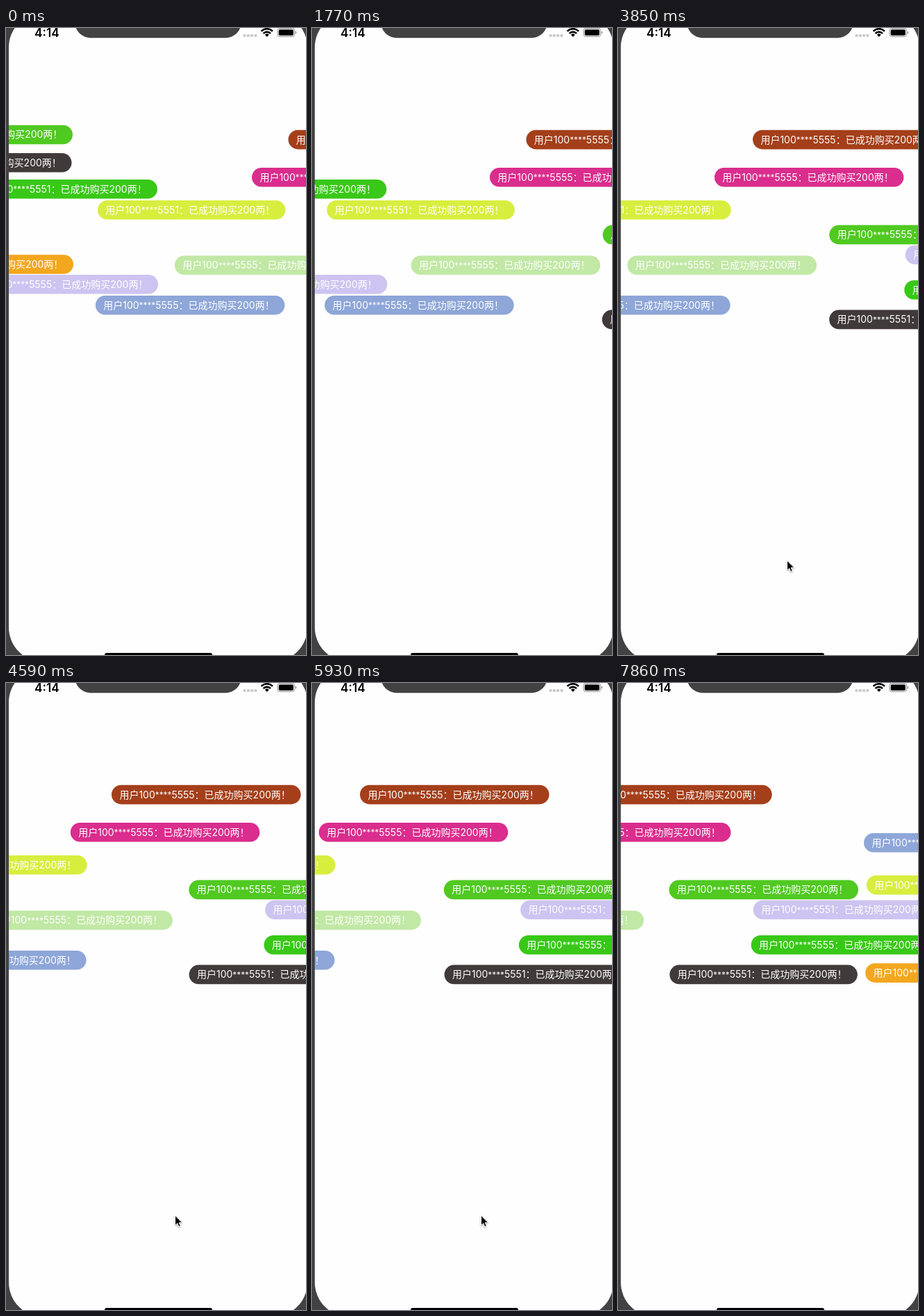
Animation of 432 by 902 pixels, one loop 8000 ms. Source, as an HTML page:

```html
<!DOCTYPE html>
<html lang="zh-CN">
<head>
<meta charset="utf-8">
<title>弹幕</title>
<style>
  html, body { margin: 0; width: 100%; height: 100%; overflow: hidden; background: #424242; }
  svg { display: block; }
  text { font-family: Inter, "Noto Sans CJK SC", "Noto Sans CJK", sans-serif; }
  .pill text { font-size: 14px; fill: #fff; }
  .pill .mask { font-size: 11.8px; }
  .clock { font-size: 17.2px; font-weight: 600; }
</style>
</head>
<body>
<svg width="432" height="902" viewBox="0 0 432 902">
  <defs>
    <clipPath id="screen"><rect x="4" y="-22" width="430" height="934" rx="50"/></clipPath>
  </defs>
  <g clip-path="url(#screen)">
    <rect width="440" height="902" fill="#fefefe"/>
    <g id="pills"></g>
    <rect x="99" y="-40" width="240" height="54.2" rx="23" fill="#424242"/>
    <text class="clock" x="41" y="13">4:14</text>
    <g fill="#c9c9c9">
      <rect x="341.5" y="9" width="4" height="3.8" rx="1"/>
      <rect x="346.8" y="9" width="4" height="3.8" rx="1"/>
      <rect x="352.1" y="9" width="4" height="3.8" rx="1"/>
      <rect x="357.4" y="9" width="4" height="3.8" rx="1"/>
    </g>
    <g fill="none" stroke="#000" stroke-width="2.6">
      <path d="M367.6 4.6a11.6 11.6 0 0 1 16.4 0"/>
      <path d="M370.6 7.8a7.4 7.4 0 0 1 10.4 0"/>
      <path d="M372.9 9.7a4.2 4.2 0 0 1 5.8 0L375.8 12.8z" fill="#000" stroke="none"/>
    </g>
    <rect x="391" y=".6" width="24.6" height="11.8" rx="3.2" fill="none" stroke="#8c8c8c"/>
    <rect x="392.7" y="2.2" width="21.2" height="8.6" rx="1.8"/>
    <path d="M416.8 4.4q1.5.5 1.5 2.1t-1.5 2.1z" fill="#8c8c8c"/>
    <rect x="142" y="899" width="155" height="6" rx="3"/>
  </g>
  <path id="cursor" d="M0 0V14.2L3.2 11.2L5.3 16.2L7.8 15.2L5.7 10.3H10.2Z" stroke="#fff" stroke-width="1"
        style="filter:drop-shadow(0 1px 1px rgba(0,0,0,.35))"/>
</svg>
<script>
const LOOP = 8000, EDGE = 435, HEIGHT = 27.6;
const ENTER_STEPS = 33.35;   // steps to slide fully into view
const EXIT_SPEED = 9.22;     // px per step after that
const WIDE = { width: 272.5, ending: '5555' };
const SLIM = { width: 270.5, ending: '5551' };

// [colour, top, step at which the pill is fully in view, label]
const PILLS = [
  ['#50c921', 139.7, -36.77, WIDE],
  ['#403a3b', 180, -36.93, WIDE],
  ['#f3a71f', 326.2, -36.66, WIDE],
  ['#38c817', 218, -23.54, SLIM],
  ['#cdc4f1', 355, -23.42, WIDE],
  ['#8ea6d8', 385, -3.65, WIDE],
  ['#d8ee3f', 248, -3.53, SLIM],
  ['#c1e8a5', 327.5, 9.84, WIDE],
  ['#da2d8d', 201, 23.44, WIDE],
  ['#a43f1a', 146.8, 29.86, WIDE],
  ['#403a3b', 405.6, 43.22, SLIM],
  ['#50c921', 283.6, 43.35, WIDE],
  ['#38c817', 363, 56.57, WIDE],
  ['#cdc4f1', 312.5, 56.73, SLIM],
  ['#8ea6d8', 216, 76.44, WIDE],
  ['#f3a71f', 403.3, 76.7, WIDE],
  ['#d8ee3f', 276.8, 76.84, SLIM]
];

// [first step, x, y]; no position means hidden
const CURSOR = [[0], [18, 243.5, 766], [47, 263.5, 831], [49, 270, 884], [50]];

// Steps last 150 ms, a few 140 ms
const SHORT = [2, 6, 10, 14, 18, 28, 36, 44, 52];
const STARTS = Array.from({ length: 54 },
  (_, i) => i * 150 - 10 * SHORT.filter(s => s < i).length);

function make(parent, tag, attrs, text = '') {
  const node = document.createElementNS('http://www.w3.org/2000/svg', tag);
  for (const key in attrs) node.setAttribute(key, attrs[key]);
  node.textContent = text;
  return parent.appendChild(node);
}

const layer = document.getElementById('pills');
const cursor = document.getElementById('cursor');

const pills = PILLS.map(([fill, top, inView, { width, ending }]) => {
  const node = make(layer, 'g', { class: 'pill' });
  make(node, 'rect', { width, height: HEIGHT, rx: HEIGHT / 2, fill });
  const label = make(node, 'text', { x: 11.4, y: 18.8 }, '用户100');
  make(label, 'tspan', { class: 'mask', dy: -0.8 }, '****');
  make(label, 'tspan', { dy: 0.8 }, `${ending}：已成功购买200两！`);
  return { node, top, inView, width };
});

function place(node, x, y) {
  node.setAttribute('transform', `translate(${x.toFixed(2)} ${y})`);
}

function draw(step) {
  for (const { node, top, inView, width } of pills) {
    const speed = step < inView ? width / ENTER_STEPS : EXIT_SPEED;
    place(node, EDGE - width - (step - inView) * speed, top);
  }
  const [, x, y] = CURSOR.findLast(([first]) => first <= step);
  cursor.style.display = x === undefined ? 'none' : '';
  if (x !== undefined) place(cursor, x, y);
}

const begin = performance.now();
function tick() {
  const time = (performance.now() - begin) % LOOP;
  draw(STARTS.findLastIndex(start => start <= time));
  requestAnimationFrame(tick);
}
tick();
</script>
</body>
</html>
```
